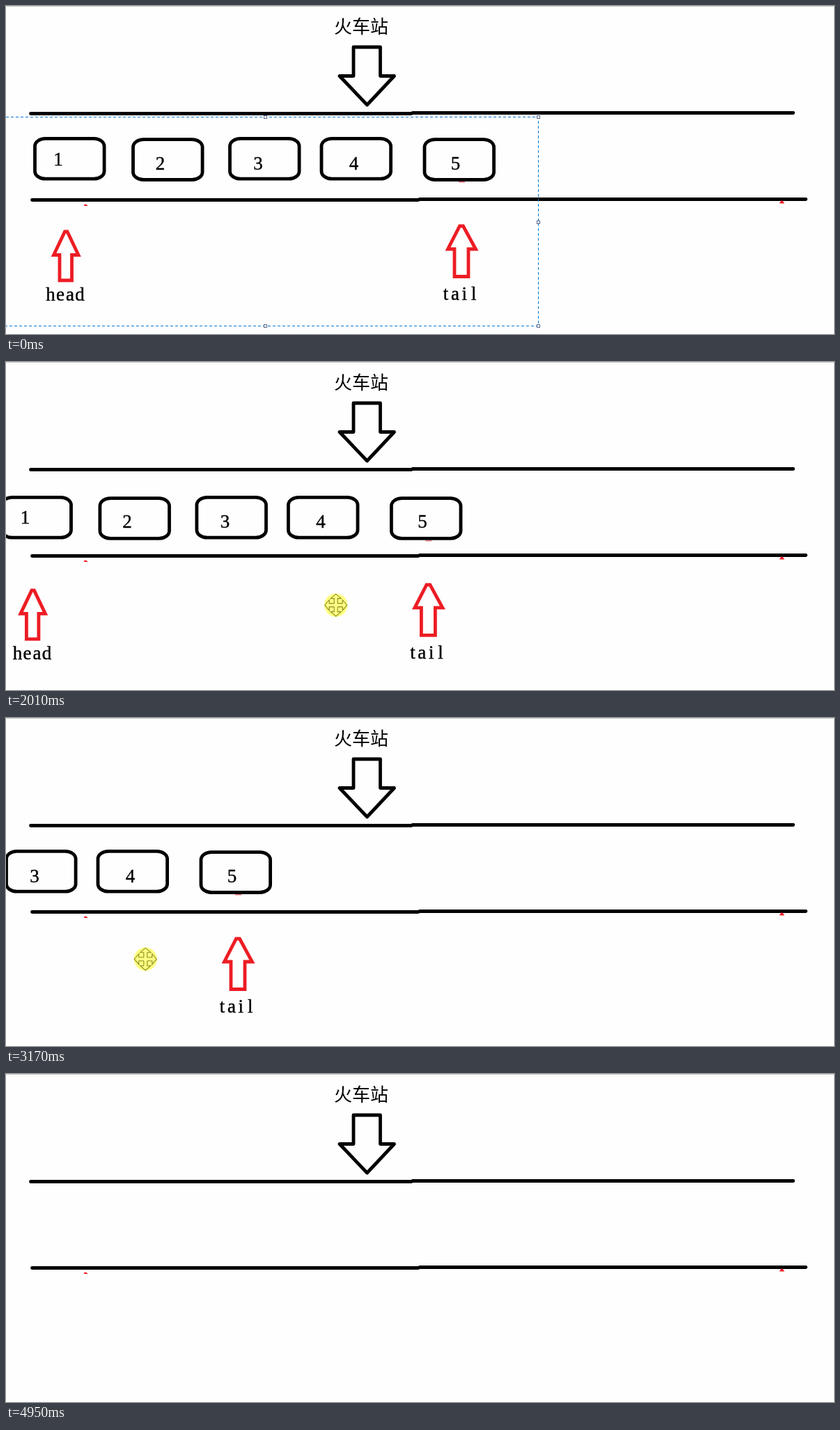
An HTML page for the animation above (7.4 s loop, 1189x471 px).

```html
<!DOCTYPE html>
<html lang="zh">
<head>
<meta charset="utf-8">
<title>Queue</title>
<style>
  html, body { margin: 0; width: 100%; height: 100%; overflow: hidden; background: #fefefe; }
  svg { display: block; width: 100%; height: 100%; }
  .ink { fill: none; stroke: #000; stroke-width: 4.8; stroke-linejoin: round; stroke-linecap: round; }
  .red { stroke: #ed1c24; stroke-linejoin: miter; stroke-linecap: butt; }
  .title { font: 300 26px "Noto Sans CJK SC", "Noto Sans CJK", sans-serif; }
  .mono { font: 27px "Liberation Serif", "Noto Serif", serif; text-anchor: middle; stroke: #000; stroke-width: .4; }
  .dash { fill: none; stroke: #0078d7; stroke-dasharray: 4 3; }
  .handle { fill: #fff; stroke: #5b6b8c; }
</style>
</head>
<body>
<svg viewBox="0 0 1189 471">
  <rect width="1189" height="1" fill="#c8c8c8"/>
  <text class="title" x="471" y="38.5">火车站</text>
  <path class="ink" d="M499 59H537.5V100.5H557.5L518.5 142L479 100.5H499Z"/>
  <path class="ink" d="M35.5 154.5H582M584 153.5H1130.5M37.5 278.5H592M594 277.5H1148.5"/>
  <path fill="#ed1c24" d="M112 287V285.5L114 284.5L117 286V287ZM1110.5 283.5L1113 279.5H1115L1118 283.5Z"/>

  <g id="train">
    <path class="ink red" d="M84.5 324H88L104 357.5H94.5V394H77V357.5H68.5Z"/>
    <path class="ink red" d="M651.5 316H656.5L674.5 349H664V388.5H644V349H634.5Z"/>
    <rect x="650" y="252" width="9" height="1.5" fill="#f2777c"/>
  </g>

  <g id="selection">
    <path class="dash" d="M0 159.5H764.5V459.5H0"/>
  </g>

  <g id="cursor">
    <circle r="16.7" fill="#ffff82"/>
  </g>
</svg>
<script>
const LOOP = 7400, STEP = 70, PHASE = 10;
const APPEAR = 790, ARRIVE = 1210, GRAB = 1610, GONE = 4950;
const [train, selection, cursor] =
  ['train', 'selection', 'cursor'].map(id => document.getElementById(id));

function add(parent, tag, attrs, text = '') {
  const node = document.createElementNS('http://www.w3.org/2000/svg', tag);
  for (const key in attrs) node.setAttribute(key, attrs[key]);
  node.textContent = text;
  parent.append(node);
}

// Monospaced label: every character is centred in its own cell.
function label(text, x, y, cell = 14) {
  const xs = [...text].map((_, i) => x + i * cell).join(' ');
  add(train, 'text', { class: 'mono', x: xs, y }, text);
}

// Carriages: left edge and digit centre
[[41.5, 75], [182.5, 221.5], [321.5, 362], [453, 499.5], [601, 645.5]].forEach(([x, digitX], i) => {
  const y = i % 3 === 1 ? 191.7 : 190.4;
  add(train, 'rect', { class: 'ink', x, y, width: 99.6, height: 57.8, rx: 15, ry: 11 });
  label(String(i + 1), digitX, i ? 234.5 : 228.5);
});
label('head', 64, 423);
label('tail', 631.5, 422, 13.4);

// Selection handles on the corners and edge middles that are in view
for (const x of [372, 764])
  for (const y of [159, 310, 459])
    if (x === 764 || y !== 310)
      add(selection, 'rect', { class: 'handle', x: x - 1.5, y: y - 1.5, width: 4, height: 4 });

// Four-way move cursor: the same arm at each quarter turn
for (let angle = 0; angle < 360; angle += 90)
  add(cursor, 'path', {
    d: 'M-2.5 -2.5V-9.5H-7.5L0 -16L7.5 -9.5H2.5V-2.5',
    transform: `rotate(${angle})`, fill: 'none', stroke: '#8d8d25', 'stroke-width': 1.1
  });

// Turning points of the drag: time, x offset, y offset
const DRAG = [[1740, 0, 0], [2320, -120, 10], [2460, -134, 10], [3160, -321, 1], [3650, -433, 1],
  [4000, -502, 1], [4140, -575, 9], [4560, -631, 9], [4910, -720, 7]];

const mix = (a, b, p) => a + (b - a) * p;

function dragAt(t) {
  const next = DRAG.findIndex(key => key[0] > t);
  if (next === 0) return [0, 0];
  if (next < 0) return DRAG.at(-1).slice(1);
  const [t0, x0, y0] = DRAG[next - 1], [t1, x1, y1] = DRAG[next];
  const p = (t - t0) / (t1 - t0);
  return [mix(x0, x1, p), mix(y0, y1, p)];
}

const show = (node, visible) => node.setAttribute('visibility', visible ? 'visible' : 'hidden');
const move = (node, x, y) => node.setAttribute('transform', `translate(${x} ${y})`);

function draw(now) {
  const t = now % LOOP;
  // The picture refreshes only every STEP ms.
  const tick = Math.floor((t - PHASE) / STEP) * STEP + PHASE;
  const [dx, dy] = dragAt(tick);
  const remaining = Math.min(1, Math.max(0, (ARRIVE - tick) / (ARRIVE - APPEAR)));

  move(train, dx, dy);
  move(cursor, 521.3 + dx - 20 * remaining, 345.2 + dy + 106 * remaining);
  show(train, t < GONE);
  show(selection, t < GRAB);
  show(cursor, t >= APPEAR && t < GONE);
  requestAnimationFrame(draw);
}
draw(0);
</script>
</body>
</html>
```
